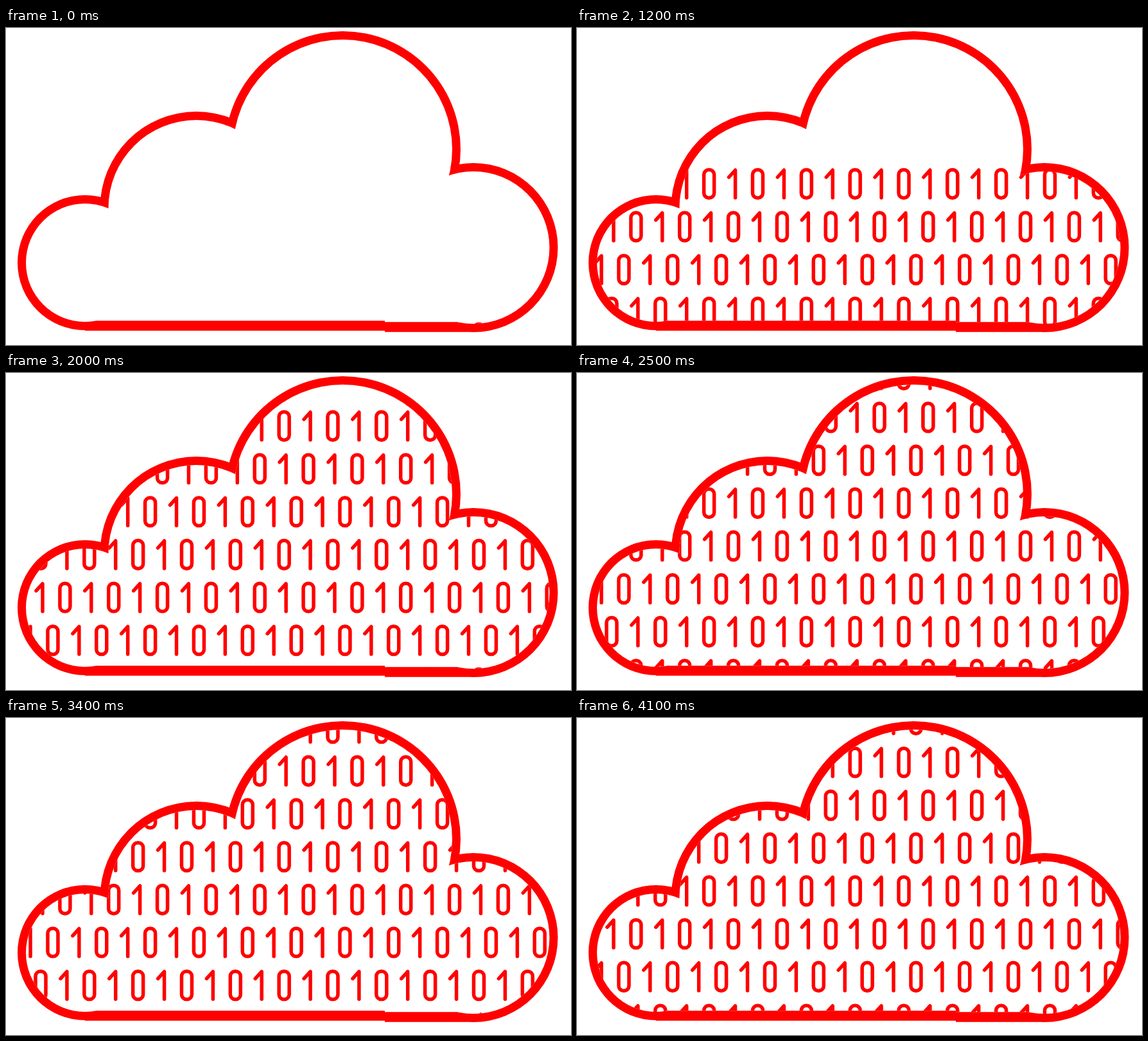
These frames come from a looping animation (880x493 px, 4200 ms). An HTML page with a canvas:

```html
<!DOCTYPE html>
<html lang="en">
<head>
<meta charset="utf-8">
<title>Binary cloud</title>
<style>
  html, body { margin: 0; width: 100%; height: 100%; overflow: hidden; background: #fff; }
  canvas { display: block; }
</style>
</head>
<body>
<canvas id="stage" width="880" height="493"></canvas>
<script>
const ctx = document.getElementById('stage').getContext('2d');
const LOOP = 4200, STEP = 100;
const FILL_STEPS = 22, FILL_SPEED = 20, START = 458;
const PERIOD = 75.83, ROW = 200 / 3;

// Centre and mid-line radius of each round part of the cloud
const LOBES = [[123, 365, 98.5], [296.5, 280, 143.5], [524.5, 188.5, 177], [728, 341.5, 125]];
const BAND = 13;

// The cloud as a union of discs and a base with a small step in it
function cloud(grow) {
  const path = new Path2D();
  for (const [x, y, r] of LOBES) {
    path.moveTo(x + r + grow, y);
    path.arc(x, y, r + grow, 0, 2 * Math.PI);
  }
  path.rect(123, 320, 467, 143 + grow * 1.2);
  path.rect(590, 320, 138, 145 + grow * 1.2);
  return path;
}

const outer = cloud(BAND / 2), inner = cloud(-BAND / 2);

const zero = new Path2D();
zero.roundRect(-8, 2.6, 16, 43.6, 7.5);
const one = new Path2D('M-7,14 L3,3 V46');

// Rises from below, then cycles by three rows with a pause of one step between cycles
function scrollAt(step) {
  if (step <= FILL_STEPS) return step * FILL_SPEED;
  const since = step - FILL_STEPS - 1;
  const cycle = Math.floor(since / 10);
  const notch = Math.round(since % 10 * 5 / 3);
  return FILL_STEPS * FILL_SPEED + cycle * 3 * ROW + notch * ROW / 5;
}

function digit(path, x, y) {
  ctx.save();
  ctx.translate(x, y);
  ctx.stroke(path);
  ctx.restore();
}

function drawRows(top) {
  for (let row = 0, y = top; y < 480; row++, y = top + row * ROW) {
    const shift = 54 + [0, PERIOD / 2, PERIOD / 4][row % 3];
    for (let x = shift - PERIOD; x < 900; x += PERIOD) {
      digit(zero, x, y);
      digit(one, x + PERIOD / 2, y);
    }
  }
}

function draw(now) {
  const step = Math.floor(now % LOOP / STEP);
  ctx.clearRect(0, 0, 880, 493);
  ctx.fillStyle = ctx.strokeStyle = '#f00';
  ctx.fill(outer);
  ctx.fillStyle = '#fff';
  ctx.fill(inner);

  ctx.save();
  ctx.clip(inner);
  ctx.lineWidth = 5.5;
  ctx.lineCap = ctx.lineJoin = 'round';
  drawRows(START - scrollAt(step));
  ctx.restore();
}

function tick() {
  draw(performance.now());
  requestAnimationFrame(tick);
}
tick();
</script>
</body>
</html>
```
